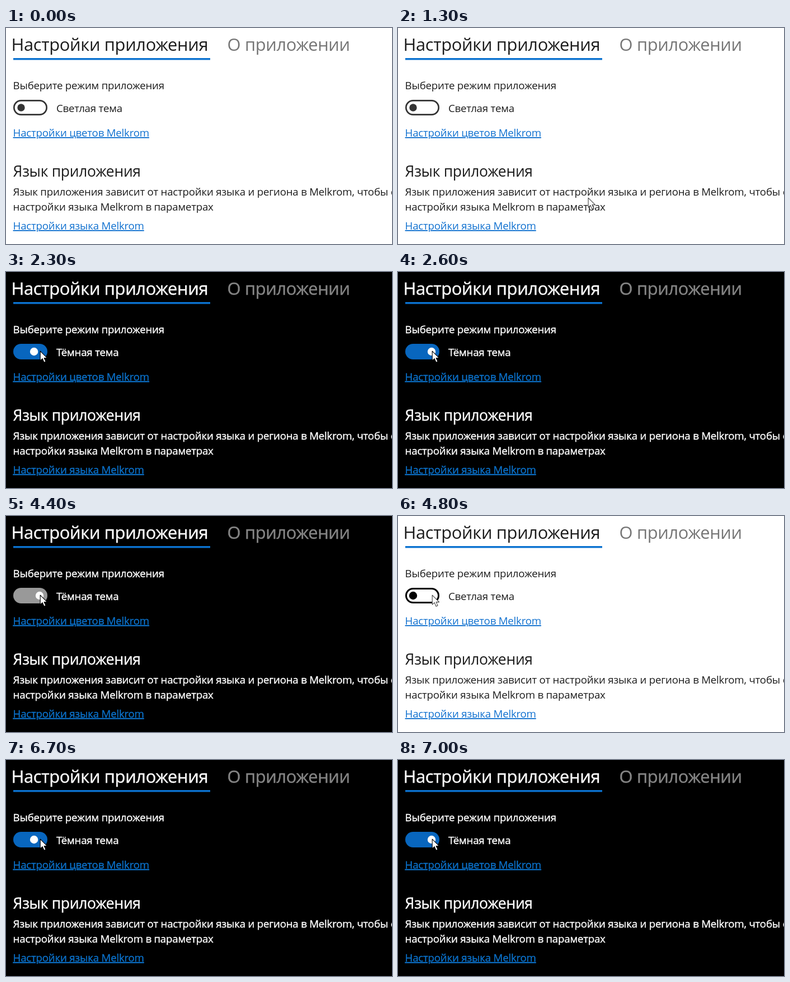
An HTML page that plays this animation: 690 by 388 pixels, repeating every 8 s.

```html
<!DOCTYPE html>
<html lang="ru">
<head>
<meta charset="utf-8">
<style>
html, body { margin: 0; width: 100%; height: 100%; overflow: hidden; background: #fff; }
svg { display: block; width: 690px; height: 388px; --bg: #fff; --ink: #1c1c1c; --dim: #767676; --link: #0f70cf; --edge: #444; --bold: 0; }
svg.dark { --bg: #000; --ink: #fff; --dim: #858585; --link: #0b70c8; --edge: #000; --bold: .4px; }
text { font: 18.7px "Open Sans", "Noto Sans", sans-serif; letter-spacing: -.012em; color: var(--ink); fill: currentColor; stroke: currentColor; stroke-width: var(--bold); white-space: pre; }
.tab { font-size: 30.9px; }
.head { font-size: 26.5px; }
.dim { color: var(--dim); }
.link { color: var(--link); text-decoration: underline; }
</style>
</head>
<body>
<svg id="stage" viewBox="0 0 690 388">
  <rect width="690" height="388" fill="var(--bg)"/>
  <text class="tab" x="9.6" y="41">Настройки приложения</text>
  <text class="tab dim" x="395.6" y="41">О приложении</text>
  <rect x="13" y="54" width="352" height="3.4" fill="#0b72d0"/>
  <text x="12.6" y="110">Выберите режим приложения</text>
  <rect id="track" rx="12.5"/>
  <circle id="knob" cy="143"/>
  <text id="label" x="90" y="151"></text>
  <text class="link" x="12.6" y="195">Настройки цветов Melkrom</text>
  <text class="head" x="12.6" y="267.4">Язык приложения</text>
  <text x="12.6" y="301.4">Язык приложения зависит от настройки языка и региона в Melkrom, чтобы ежедневно</text>
  <text x="12.6" y="328">настройки языка Melkrom в параметрах</text>
  <text class="link" x="12.6" y="362">Настройки языка Melkrom</text>
  <path id="cursor" d="M0 0V17L4 13.4 6.8 20 9.8 18.7 7 12.4H12.4Z" fill="#fff" stroke="var(--edge)" stroke-width="1.1" stroke-linejoin="round"/>
</svg>
<script>
const $ = id => document.getElementById(id);
const set = (el, attrs) => { for (const k in attrs) el.setAttribute(k, attrs[k]); };
const OFF = 27, ON = 60;
const switches = [[2300, true], [4500, false], [6700, true]];

function draw(time) {
  let dark = false, slide = 1;
  for (const [at, on] of switches) {
    if (time < at) break;
    dark = on;
    slide = time - at >= 300 ? 1 : 1 - 0.3 ** (1 + (time - at) / 100);
  }
  const pressed = time === 4400 || time === 6600;
  const hover = time >= 1700;
  const filled = dark || pressed;

  $('stage').classList.toggle('dark', dark);
  $('label').textContent = dark ? 'Тёмная тема' : 'Светлая тема';

  const tone = hover ? '#000' : '#333';
  const line = filled ? 0 : hover ? 3 : 2.7;
  set($('track'), {
    x: 13 + line / 2, y: 129 + line / 2,
    width: 61 - line, height: 28 - line, rx: 14 - line / 2,
    fill: pressed ? (dark ? '#999' : '#666') : dark ? '#0866be' : 'none',
    stroke: tone, 'stroke-width': line
  });
  const from = dark ? OFF : ON, to = dark ? ON : OFF;
  set($('knob'), {
    cx: from + (to - from) * slide,
    r: hover ? 7.2 : 6.7,
    fill: filled ? '#fff' : tone
  });

  // The pointer sweeps in from the lower right and slows over the switch.
  const p = Math.min(1, Math.max(0, (time - 1000) / 800));
  const left = 1 - p * p * (3 - 2 * p);
  set($('cursor'), {
    transform: `translate(${61.2 + 408 * left} ${142.2 + 221 * left ** 0.8})`,
    visibility: time < 1000 ? 'hidden' : 'visible'
  });
}

const start = performance.now();
function tick() {
  draw(Math.floor((performance.now() - start) % 8000 / 100) * 100);
  requestAnimationFrame(tick);
}
tick();
</script>
</body>
</html>
```
